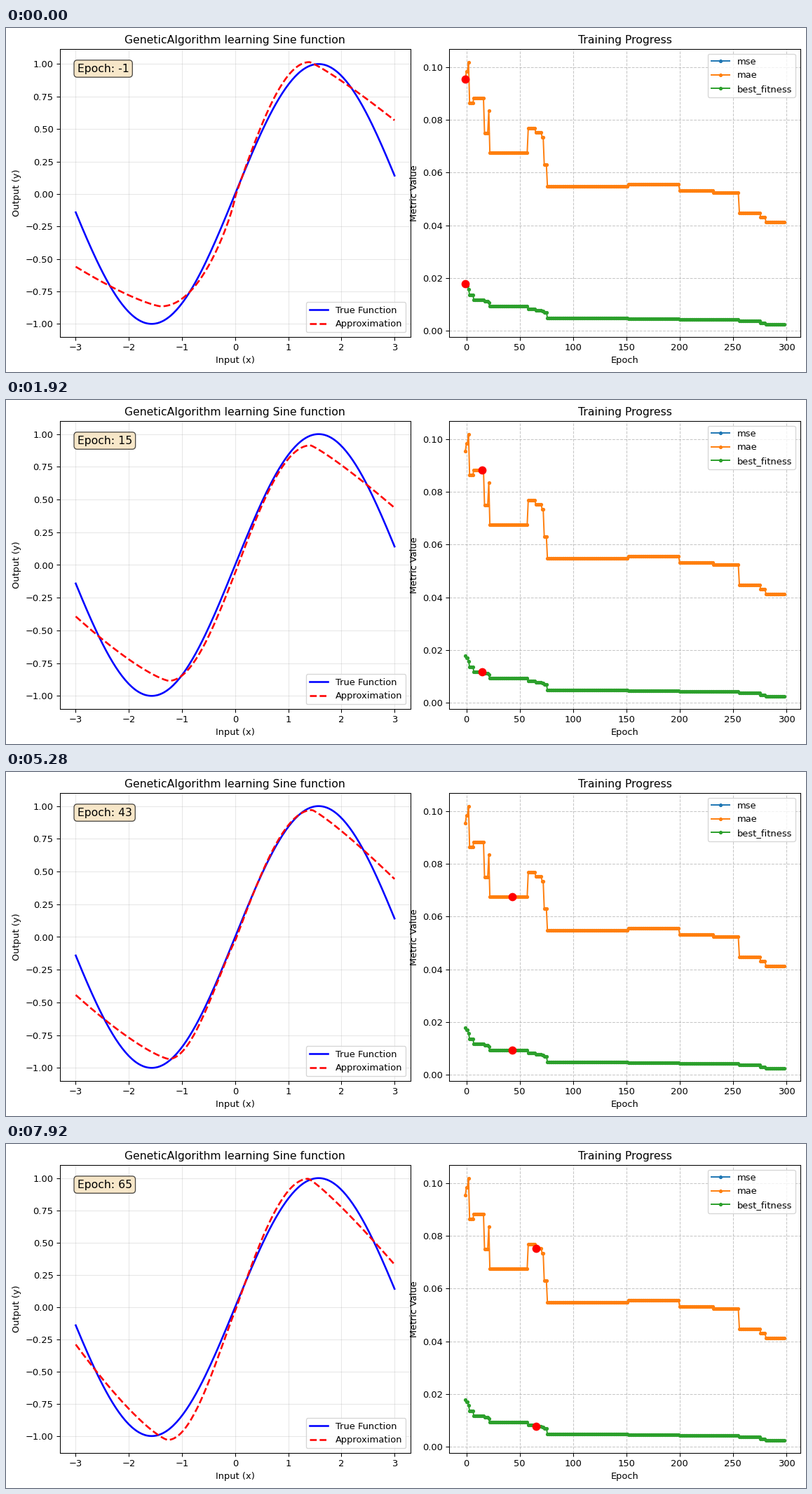
These frames come from a looping animation (1141x491 px, 8 s). A matplotlib script:

```python
import numpy as np
import matplotlib.pyplot as plt
from matplotlib.animation import FuncAnimation

WIDTH, HEIGHT, DPI = 1141, 491, 94
LOOP_MS, TICK_MS, EPOCH_MS = 8000, 40, 120

plt.rcParams["font.family"] = "DejaVu Sans"


def shape(start, trough, centre, peak, end, bend):
    return np.array([start, *trough, centre, *peak, end, bend])


def mix(a, b, t):
    return a + (b - a) * t


def fitted_curve(x, params):
    """Sine quarters between trough and peak, nearly straight tails outside."""
    start, trough_x, trough_y, centre, peak_x, peak_y, end, bend = params
    fall = np.clip(x / trough_x, 0, 1) ** bend
    rise = np.clip(x / peak_x, 0, 1)
    left_tail = np.clip((trough_x - x) / (trough_x + 3), 0, 1) ** 1.3
    right_tail = np.clip((x - peak_x) / (3 - peak_x), 0, 1) ** 1.15
    return (centre
            + (trough_y - centre) * np.sin(np.pi / 2 * fall)
            + (peak_y - centre) * np.sin(np.pi / 2 * rise)
            + (start - trough_y) * left_tail
            + (end - peak_y) * right_tail)


INITIAL = shape(-.56, (-1.4, -.865), -.02, (1.4, 1.015), .567, .81)
EARLY = shape(-.525, (-1.33, -.907), .03, (1.22, 1.015), .415, .87)
MIDDLE = shape(-.393, (-1.25, -.885), -.06, (1.42, .914), .437, 1.0)
STEADY = shape(-.443, (-1.25, -.932), -.03, (1.45, .97), .443, 1.12)
LATE = shape(-.29, (-1.27, -1.03), -.03, (1.38, .995), .33, 1.06)

# (first epoch, shape): each holds until the next one takes over.
FITS = [
    (-1, INITIAL),
    (0, mix(INITIAL, EARLY, .5)),
    (2, EARLY),
    (3, mix(EARLY, MIDDLE, .2)),
    (7, MIDDLE),
    (17, mix(MIDDLE, STEADY, 1.1)),
    (21, mix(STEADY, LATE, .5)),
    (22, STEADY),
    (58, mix(STEADY, LATE, .8)),
    (65, LATE),
]

# (first epoch, mae, best fitness) of each plateau.
PLATEAUS = [
    (-1, .0955, .0177), (0, .0984, .0171), (2, .1019, .0157), (3, .0863, .0136),
    (7, .0884, .0118), (17, .0751, .0111), (21, .0836, .0107), (22, .0676, .0092),
    (58, .0769, .0082), (65, .0753, .0078), (71, .0735, .0074), (73, .0630, .0070),
    (76, .0547, .0048), (152, .0556, .0045), (200, .0532, .0043),
    (232, .0523, .0043), (256, .0448, .0037), (276, .0431, .0028),
    (281, .0411, .0025),
]


def current(steps, epoch):
    return [values for start, *values in steps if start <= epoch][-1]


epochs = np.arange(-1, 299)
mae, fitness = np.array([current(PLATEAUS, e) for e in epochs]).T

# The tiny surplus keeps the pixel size from rounding down.
fig = plt.figure(figsize=((WIDTH + 1e-6) / DPI, (HEIGHT + 1e-6) / DPI), dpi=DPI,
                 facecolor="white")


def add_panel(left, title, xlabel, ylabel):
    ax = fig.add_axes([left / WIDTH, 50 / HEIGHT, 500.2 / WIDTH, 411 / HEIGHT])
    ax.set_title(title)
    ax.set_xlabel(xlabel)
    ax.set_ylabel(ylabel)
    return ax


fit_ax = add_panel(76.7, "GeneticAlgorithm learning Sine function",
                   "Input (x)", "Output (y)")
x = np.linspace(-3, 3, 200)
fit_ax.plot(x, np.sin(x), "b-", lw=2, label="True Function")
fit_line, = fit_ax.plot(x, fitted_curve(x, INITIAL), "r--", lw=2,
                        label="Approximation")
fit_ax.set_xlim(-3.3, 3.3)
fit_ax.grid(True, alpha=0.3)
fit_ax.legend(loc="lower right")
epoch_text = fit_ax.text(0.05, 0.95, "", transform=fit_ax.transAxes, fontsize=12,
                         va="top", bbox=dict(boxstyle="round", facecolor="wheat",
                                             alpha=0.7))

metric_ax = add_panel(632.4, "Training Progress", "Epoch", "Metric Value")
metric_ax.plot([], [], marker=".", label="mse")  # fully covered by best_fitness
metric_ax.plot(epochs, mae, marker=".", label="mae")
metric_ax.plot(epochs, fitness, marker=".", label="best_fitness")
dots, = metric_ax.plot([], [], "ro", ms=8)
metric_ax.set_xlim(-15.95, 312.95)
metric_ax.set_ylim(-.00239, .10689)
metric_ax.grid(True, linestyle="--", alpha=0.7)
metric_ax.legend(loc="upper right")


def update(frame):
    step = frame * TICK_MS // EPOCH_MS
    epoch = step - 1
    fit = fitted_curve(x, current(FITS, epoch)[0])
    fit_line.set_ydata(fit)
    low, high = min(-1, fit.min()), max(1, fit.max())
    margin = 0.05 * (high - low)
    fit_ax.set_ylim(low - margin, high + margin)
    epoch_text.set_text(f"Epoch: {epoch}")
    dots.set_data([epoch, epoch], [mae[step], fitness[step]])
    return fit_line, epoch_text, dots


anim = FuncAnimation(fig, update, frames=LOOP_MS // TICK_MS, interval=TICK_MS,
                     repeat=True, repeat_delay=0)
plt.show()
```
